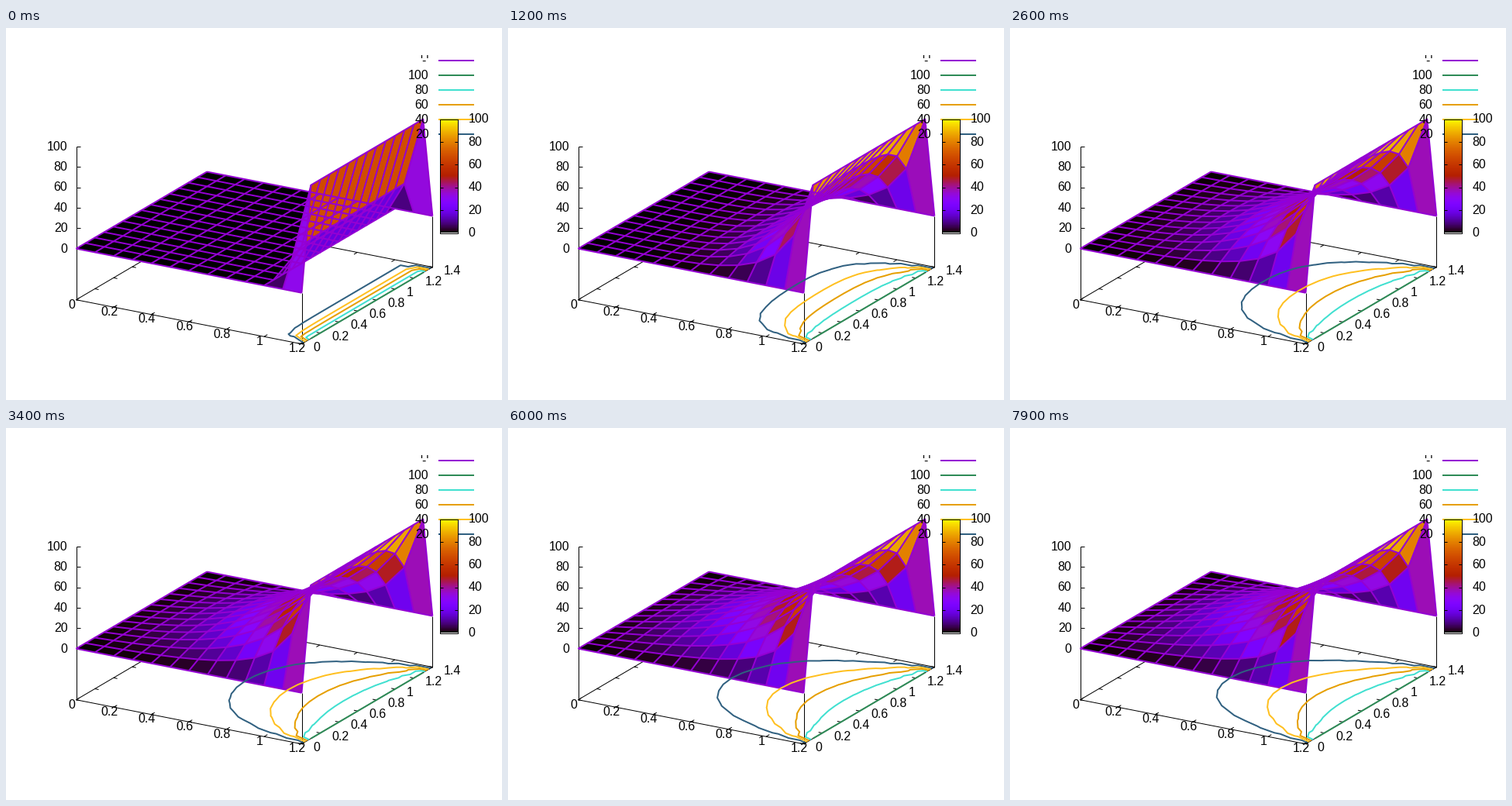
Animation, 640 px wide and 480 px high, one loop 8 s. Source, as a matplotlib script:

```python
import numpy as np
import matplotlib.pyplot as plt
from matplotlib.animation import FuncAnimation
from matplotlib.collections import LineCollection, PolyCollection

FRAMES, INTERVAL = 80, 100
NX, NY = 12, 14                      # grid cells, 0.1 units each
PX = 0.72                            # one pixel in points at 100 dpi
ORIGIN = np.array([90.0, 350.2])     # base corner on the stage
DX = np.array([291.0, 57.0]) / NX
DY = np.array([168.8, -99.2]) / NY
FLOOR, ZUNIT = 66.0, 1.32            # base to z=0, pixels per z unit
PURPLE = "#9400d3"
LEVELS = [20, 40, 60, 80]
LEVEL_COLORS = ["#306080", "#ffc020", "#e69f00", "#40e0d0"]
TOP_COLOR = "#2e8b57"


def base(k, j):
    """Stage position of grid point (k, j) on the base plane."""
    return ORIGIN + np.multiply.outer(k, DX) + np.multiply.outer(j, DY)


def palette(v):
    v = np.clip(v, 0, 1)
    blue = np.clip(np.sin(2 * np.pi * v), 0, 1)
    return np.stack([np.sqrt(v), v ** 3, blue], axis=-1)


def relax(count):
    """Gauss-Seidel sweeps of Laplace's equation with one hot wall."""
    u = np.zeros((NX + 1, NY + 1))
    u[NX, 1:NY] = 100
    states = []
    for _ in range(count):
        for k in range(1, NX):
            for j in range(1, NY):
                u[k, j] = (u[k - 1, j] + u[k + 1, j]
                           + u[k, j - 1] + u[k, j + 1]) / 4
        states.append(u.copy())
    return states


STATES = relax(FRAMES)
K, J = np.meshgrid(np.arange(NX + 1), np.arange(NY + 1), indexing="ij")
GROUND = base(K, J)

# cells from the back to the front
CK, CJ = (a.ravel() for a in np.meshgrid(
    np.arange(NX), np.arange(NY)[::-1], indexing="xy"))
CORNERS = [(CK, CJ), (CK + 1, CJ), (CK + 1, CJ + 1), (CK, CJ + 1)]


def node(k, j):
    return k * (NY + 1) + j


A, B, C, D = (node(k, j) for k, j in CORNERS)
TRIANGLES = np.concatenate([np.stack([A, B, D], 1), np.stack([B, C, D], 1)])

fig = plt.figure(figsize=(6.4, 4.8), dpi=100, facecolor="white")
ax = fig.add_axes([0, 0, 1, 1])
ax.axis("off")


def line(p, q, color="black", width=1, z=0):
    ax.plot([p[0], q[0]], [p[1], q[1]], color=color, lw=width * PX,
            zorder=z, solid_capstyle="butt")


def label(x, y, text, ha="center"):
    ax.text(x, y + 5.5, text, ha=ha, va="baseline", fontsize=16 * PX,
            family="Liberation Sans", color="black", zorder=9)


def tick(p, direction):
    line(p, p + 5 * direction / np.hypot(*direction))


def draw_box():
    c = [base(0, 0), base(NX, 0), base(NX, NY), base(0, NY)]
    for i in range(4):
        line(c[i], c[(i + 1) % 4])
        line(c[i], c[i] - [0, FLOOR])
    line(c[0], c[0] - [0, FLOOR + 100 * ZUNIT])
    for k in range(0, NX + 1, 2):
        p = base(k, 0)
        tick(p, DY)
        tick(base(k, NY), -DY)
        label(p[0] - 6, p[1] + 5.3, f"{k / 10:g}")
    for j in range(0, NY + 1, 2):
        p = base(NX, j)
        tick(p, -DX)
        tick(base(0, j), DX)
        label(p[0] + 14.5, p[1] + 3.5, f"{j / 10:g}", "left")
    for v in range(0, 101, 20):
        p = c[0] - [0, FLOOR + v * ZUNIT]
        tick(p, np.array([1.0, 0.0]))
        label(79, p[1] - 0.5, str(v), "right")


def draw_key():
    names = ["'-'", "100", "80", "60", "40", "20"]
    colors = [PURPLE, TOP_COLOR] + LEVEL_COLORS[::-1]
    for i, (name, color) in enumerate(zip(names, colors)):
        y = 41.5 + 19 * i
        line((557, y), (603, y), color, 2, 6)
        label(545, y - 0.8, name, "right")


def draw_colorbox():
    x0, x1, top, bottom = 559, 582, 117, 264
    ramp = palette(np.linspace(1, 0, 256))[:, None, :]
    ax.imshow(ramp, extent=(x0, x1, bottom, top), aspect="auto",
              interpolation="nearest", zorder=7)
    ax.add_patch(plt.Rectangle((x0, top), x1 - x0, bottom - top, fill=False,
                               ec="black", lw=PX, zorder=8))
    for v in range(0, 101, 20):
        y = bottom - (bottom - top) * v / 100
        line((x0, y), (x0 + 4, y), z=8)
        line((x1 - 4, y), (x1, y), z=8)
        label(596, y - 0.8, str(v), "left")


draw_box()
draw_key()
draw_colorbox()
line(base(NX, 1), base(NX, NY - 1), TOP_COLOR, 2, 3.5)
ax.set_xlim(-0.5, 639.5)
ax.set_ylim(479.5, -0.5)

cells = PolyCollection([], edgecolors="none", zorder=2)
mesh = LineCollection([], colors=PURPLE, linewidths=2 * PX, zorder=3)
ax.add_collection(cells, autolim=False)
ax.add_collection(mesh, autolim=False)
contours = []


def update(i):
    u = STATES[i]
    pts = GROUND.copy()
    pts[..., 1] -= FLOOR + ZUNIT * u
    cells.set_verts(np.stack([pts[c] for c in CORNERS], axis=1))
    cells.set_facecolor(palette(sum(u[c] for c in CORNERS) / 400))
    mesh.set_segments(list(pts) + list(pts.swapaxes(0, 1)))
    while contours:
        contours.pop().remove()
    contours.append(ax.tricontour(
        GROUND[..., 0].ravel(), GROUND[..., 1].ravel(), TRIANGLES, u.ravel(),
        levels=LEVELS, colors=LEVEL_COLORS, linewidths=2 * PX, zorder=4))
    return [cells, mesh]


anim = FuncAnimation(fig, update, frames=FRAMES, interval=INTERVAL,
                     init_func=lambda: [], repeat=True, repeat_delay=0,
                     blit=False)
plt.show()
```
